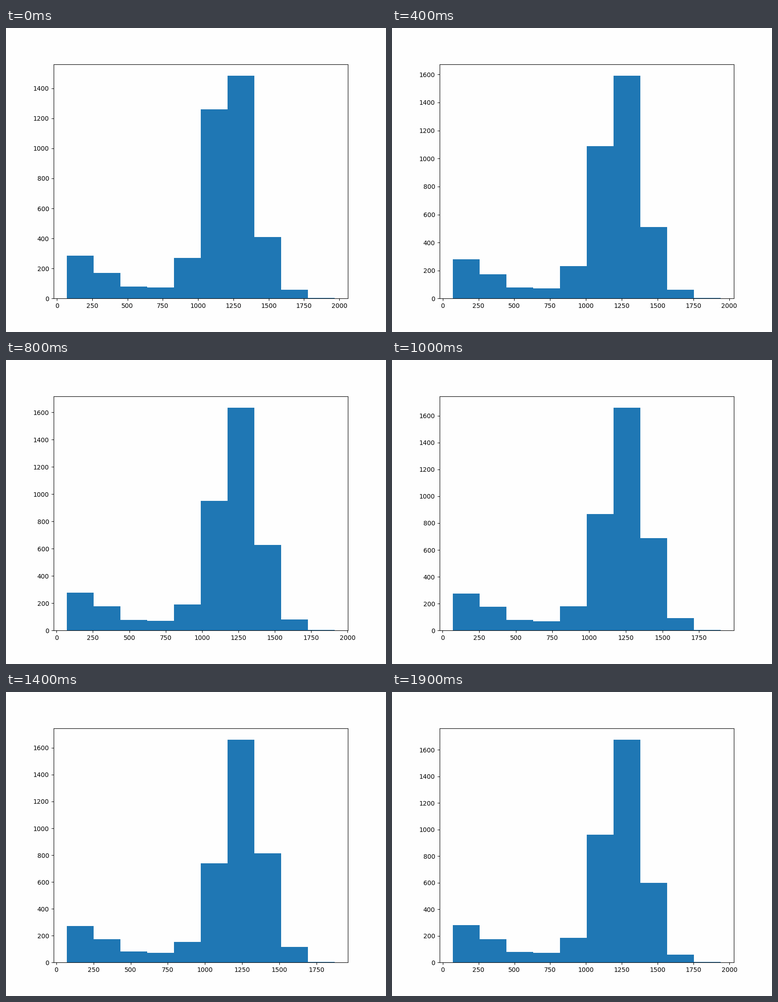
Animation of 837x669 px, one loop 2000 ms. Source, as a matplotlib script:

```python
import numpy as np
import matplotlib.pyplot as plt
from matplotlib.animation import FuncAnimation

W, H, DPI = 837, 669, 100
FRAMES, INTERVAL = 20, 100
PAPER = "#fefefe"
LOW = 71  # smallest value in the data, the same at all times

# step, largest value, then the counts of the ten bins
KEYS = np.array([
    [0, 1967, 286, 172, 80, 75, 270, 1259, 1484, 410, 58, 4],
    [2, 1954, 284, 172, 79, 74, 250, 1160, 1556, 458, 60, 4],
    [4, 1940, 282, 174, 78, 73, 231, 1088, 1592, 510, 62, 3],
    [8, 1911, 278, 178, 78, 70, 191, 952, 1634, 629, 80, 5],
    [10, 1897, 277, 178, 79, 70, 181, 868, 1660, 687, 93, 5],
    [14, 1873, 271, 175, 81, 74, 153, 741, 1661, 815, 118, 5],
    [16, 1861, 268, 174, 82, 75, 140, 680, 1658, 880, 134, 5],
    # a new outlier stretches the range at once
    [17, 1955, 284, 174, 82, 76, 217, 1050, 1653, 518, 36, 4],
    [19, 1939, 282, 174, 80, 74, 185, 962, 1676, 599, 58, 5],
])

# the small surplus keeps the pixel size from being rounded down
fig, ax = plt.subplots(figsize=((W + 0.01) / DPI, (H + 0.01) / DPI), dpi=DPI,
                       facecolor=PAPER)
fig.subplots_adjust(left=0.125, right=0.9, bottom=0.11, top=0.88)


def state(step):
    """Largest value and bin counts at a step."""
    high, *counts = [np.interp(step, KEYS[:, 0], col) for col in KEYS.T[1:]]
    return high, np.round(counts)


def draw(step):
    high, counts = state(step)
    edges = np.linspace(LOW, high, len(counts) + 1)
    ax.clear()
    ax.set_facecolor(PAPER)
    ax.hist(edges[:-1] + np.diff(edges) / 2, bins=edges, weights=counts,
            color="#1f77b4")
    return ax.patches


anim = FuncAnimation(fig, draw, frames=FRAMES, init_func=lambda: draw(0),
                     interval=INTERVAL, repeat=True, repeat_delay=0)
plt.show()
```
